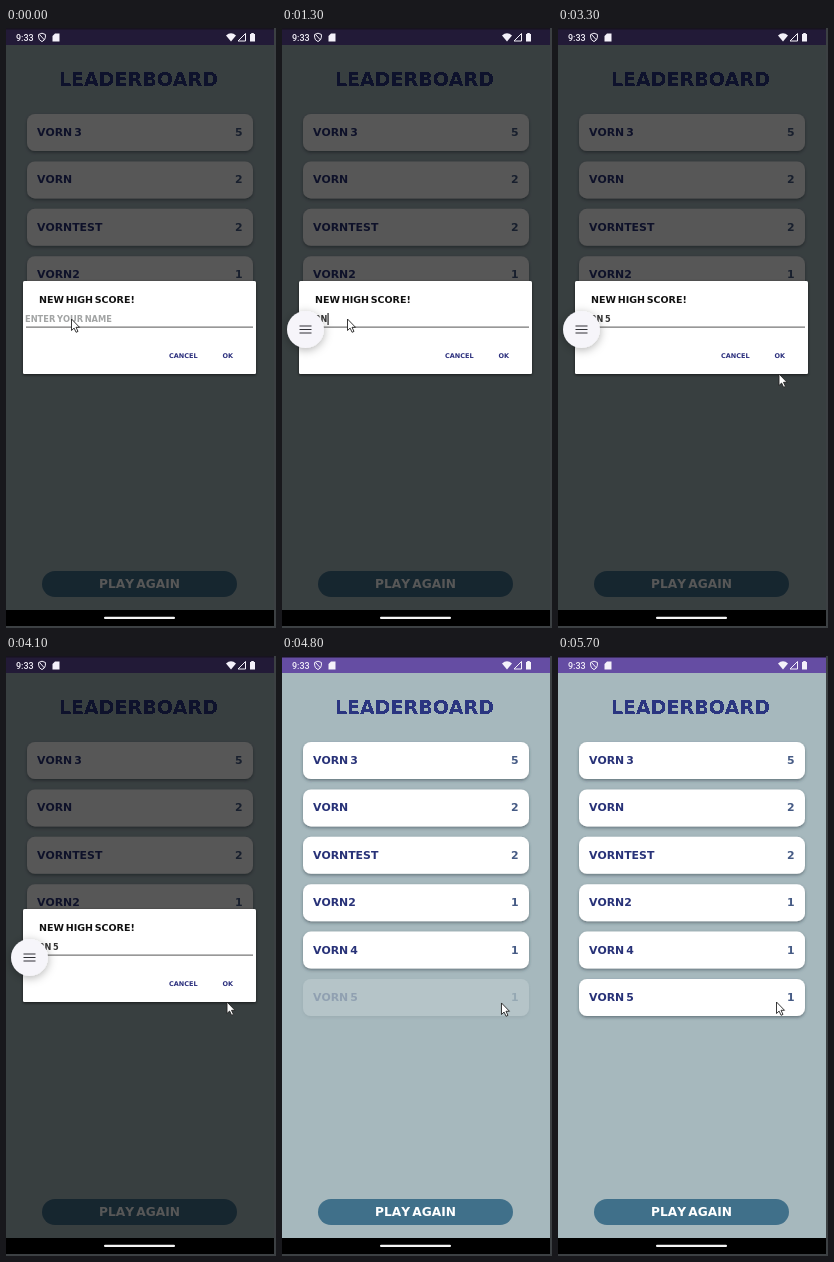
An HTML page that plays this animation: 270 px wide and 600 px high, repeating every 5.8 s.

```html
<!DOCTYPE html>
<html lang="en">
<head>
<meta charset="utf-8">
<title>Leaderboard</title>
<style>
  html, body { margin: 0; width: 100%; height: 100%; overflow: hidden; background: #000; }
  svg { display: block; width: 270px; height: 600px; }
  text { font-family: "DejaVu Sans", Verdana, sans-serif; font-weight: bold; font-kerning: none; word-spacing: -.16em; white-space: pre; }
  .clock { font: 500 9px Roboto, sans-serif; }
  .title { font-size: 19px; fill: #2b3580; }
  .name { font-size: 10.9px; fill: #283278; }
  .score { font-size: 10.9px; fill: #465b85; text-anchor: end; }
  .play { font-size: 12.2px; fill: #fff; text-anchor: middle; }
  .heading { font-size: 9.5px; fill: #101010; }
  .field { font-size: 8.2px; fill: #333; }
  .hint { font-size: 8.3px; fill: #a3a5a5; }
  .action { font-size: 6.5px; fill: #2b2f7d; }
  .line { fill: none; stroke: #303136; stroke-width: 1.2; }
</style>
</head>
<body>
<svg viewBox="0 0 270 600">
  <defs>
    <filter id="crisp">
      <feComponentTransfer><feFuncA type="discrete" tableValues="0 1"/></feComponentTransfer>
    </filter>
    <filter id="cardShadow" x="-5%" y="-20%" width="110%" height="160%">
      <feDropShadow dx="0" dy="1.6" stdDeviation="1.5" flood-color="#26383f" flood-opacity=".5"/>
    </filter>
    <filter id="barShadow" x="-100%" y="-100%" width="300%" height="300%">
      <feDropShadow dx="0" dy="2" stdDeviation="5" flood-opacity=".3"/>
    </filter>
    <filter id="dialogShadow" x="-10%" y="-20%" width="120%" height="140%">
      <feDropShadow dx="0" dy="1" stdDeviation="1.5" flood-opacity=".6"/>
    </filter>
  </defs>

  <rect width="270" height="600" fill="#a6b8bd"/>
  <rect width="270" height="17" fill="#654da3"/>
  <text class="title" x="53" y="58" filter="url(#crisp)">LEADERBOARD</text>
  <g id="cards"></g>
  <rect x="36" y="543" width="195" height="26" rx="13" fill="#40708a"/>
  <text class="play" x="133.5" y="559.5">PLAY AGAIN</text>
  <rect id="dim" width="270" height="582"/>

  <rect width="270" height="1.5" fill="#17131f"/>
  <rect y="582" width="270" height="18"/>
  <path d="M269 0v599H0" fill="none" stroke="#3c4043" stroke-width="2"/>
  <rect x="98" y="588.7" width="71" height="2.3" rx="1.1" fill="#f4f4f4"/>

  <g fill="#f4f1fa">
    <text class="clock" x="10" y="13">9:33</text>
    <path d="M36 5.2l3.4 1.3v2.7q0 2.8-3.4 4.4-3.4-1.6-3.4-4.4V6.5zM33.5 6.5l5 5.5" fill="none" stroke="#f4f1fa"/>
    <path d="M49 5.5h4.500v8h-7v-5.500z"/>
    <path d="M220 7.5q5-4.500 10 0l-5 6z"/>
    <path d="M239.5 5.5v7.500h-7.500z" fill="none" stroke="#f4f1fa"/>
    <path d="M244 6h1.200v-1h2.600v1h1.200v7.500h-5z"/>
  </g>

  <g id="dialog">
    <rect x="17" y="253" width="233" height="93" rx="1.5" fill="#fff" filter="url(#dialogShadow)"/>
    <text class="heading" x="33" y="275">NEW HIGH SCORE!</text>
    <text class="hint" id="hint" x="19" y="294">ENTER YOUR NAME</text>
    <text class="field" id="field" x="19" y="294"></text>
    <rect id="caret" y="285" width="1.2" height="12" fill="#222"/>
    <rect x="20" y="298.6" width="227" height="1" fill="#555"/>
    <text class="action" x="163" y="330">CANCEL</text>
    <text class="action" x="216.5" y="330">OK</text>
  </g>

  <g id="bar">
    <rect id="pill" x="5" width="37" rx="18.5" fill="#f6f5fa" filter="url(#barShadow)"/>
    <g id="tools">
      <circle cx="23.5" cy="301.5" r="14.5" fill="#d4dcf8"/>
      <g transform="translate(23.5 234)">
        <rect x="-2.2" y="-6.5" width="4.4" height="8.5" rx="2.2" fill="#303136"/>
        <path class="line" d="M-4.500-.5a4.500 4.500 0 0 0 9 0M0 4v3"/>
      </g>
      <path class="line" d="M15.5 268l4-5.500h11.500v11H19.500zM22.5 265.500l5 5M27.500 265.500l-5 5"/>
      <path class="line" d="M17.5 301.500l4 4 8-8"/>
      <g transform="translate(23.5 335.5)">
        <circle class="line" r="5.7"/>
        <path class="line" d="M-3 1.500q3 3 6 0"/>
        <circle cx="-2" cy="-1.500" r=".9" fill="#303136"/>
        <circle cx="2" cy="-1.500" r=".9" fill="#303136"/>
      </g>
    </g>
    <path class="line" id="menu" d="M-6-3.500h12M-6 0h12M-6 3.500h12"/>
  </g>

  <path id="pointer" d="M0 0v11.500l2.600-2.400 2 4.200 1.900-.9-2-4.100h3.500z" fill="#fff" stroke="#222" stroke-width=".9" stroke-linejoin="round"/>
</svg>
<script>
const LOOP = 5800;
const $ = id => document.getElementById(id);

const entries = [["VORN 3", 5], ["VORN", 2], ["VORNTEST", 2], ["VORN2", 1], ["VORN 4", 1], ["VORN 5", 1]];
const typed = [[0, ""], [700, "V"], [850, "VO"], [1000, "VOR"], [1200, "VORN"], [1500, "VORN "], [1800, "VORN 5"]];
// time, x, y
const route = [[0, 65.5, 291], [2000, 65.5, 291], [2400, 228, 326], [2600, 261, 337], [2700, 261, 337],
  [3000, 221, 346], [4300, 221, 346], [4700, 219.5, 347], [5700, 218.5, 346]];

$("cards").innerHTML = entries.map(([name, score], i) => `
  <g transform="translate(21 ${86 + i * 47.4})">
    <rect width="226" height="37" rx="8" fill="#fff" filter="url(#cardShadow)"/>
    <text class="name" x="10" y="22">${name}</text>
    <text class="score" x="215.5" y="22">${score}</text>
  </g>`).join("");
const newCard = $("cards").lastElementChild;

const ramp = (t, from, to) => Math.min(1, Math.max(0, (t - from) / (to - from)));
const ease = p => p * p * (3 - 2 * p);
const mix = (a, b, p) => a + (b - a) * p;
const show = (el, alpha) => el.setAttribute("opacity", alpha);

function pointerAt(t) {
  const i = route.findLastIndex(stop => stop[0] <= t);
  const a = route[i], b = route[i + 1] || a;
  const p = a === b ? 0 : ease(ramp(t, a[0], b[0]));
  return [mix(a[1], b[1], p), mix(a[2], b[2], p)];
}

function drawField(t) {
  const [since, value] = typed.findLast(step => step[0] <= t);
  if ($("field").textContent !== value) $("field").textContent = value;
  show($("hint"), value ? 0 : 1);
  show($("caret"), value && t < 2300 && t - since < 500 ? 1 : 0);
  $("caret").setAttribute("x", 19 + $("field").getComputedTextLength());
}

function drawBar(t) {
  const enter = ease(ramp(t, 200, 500));
  const fold = ease(ramp(t, 750, 1000));
  const half = mix(85.5, 18.5, fold);
  show($("bar"), enter * (1 - ramp(t, 4150, 4350)));
  $("bar").setAttribute("transform", `translate(${mix(-42, 0, enter)} 0)`);
  $("pill").setAttribute("y", 301.5 - half);
  $("pill").setAttribute("height", half * 2);
  show($("tools"), 1 - ramp(fold, 0, 0.5));
  $("menu").setAttribute("transform", `translate(23.5 ${mix(369.5, 301.5, fold)})`);
}

function draw(t) {
  const open = 1 - ramp(t, 4150, 4350);
  show($("dim"), 0.66 * open);
  show($("dialog"), open);
  show(newCard, ramp(t, 4750, 5050));
  drawField(t);
  drawBar(t);
  $("pointer").setAttribute("transform", `translate(${pointerAt(t)})`);
}

const start = performance.now();
function tick() {
  draw((performance.now() - start) % LOOP);
  requestAnimationFrame(tick);
}
draw(0);
requestAnimationFrame(tick);
</script>
</body>
</html>
```
